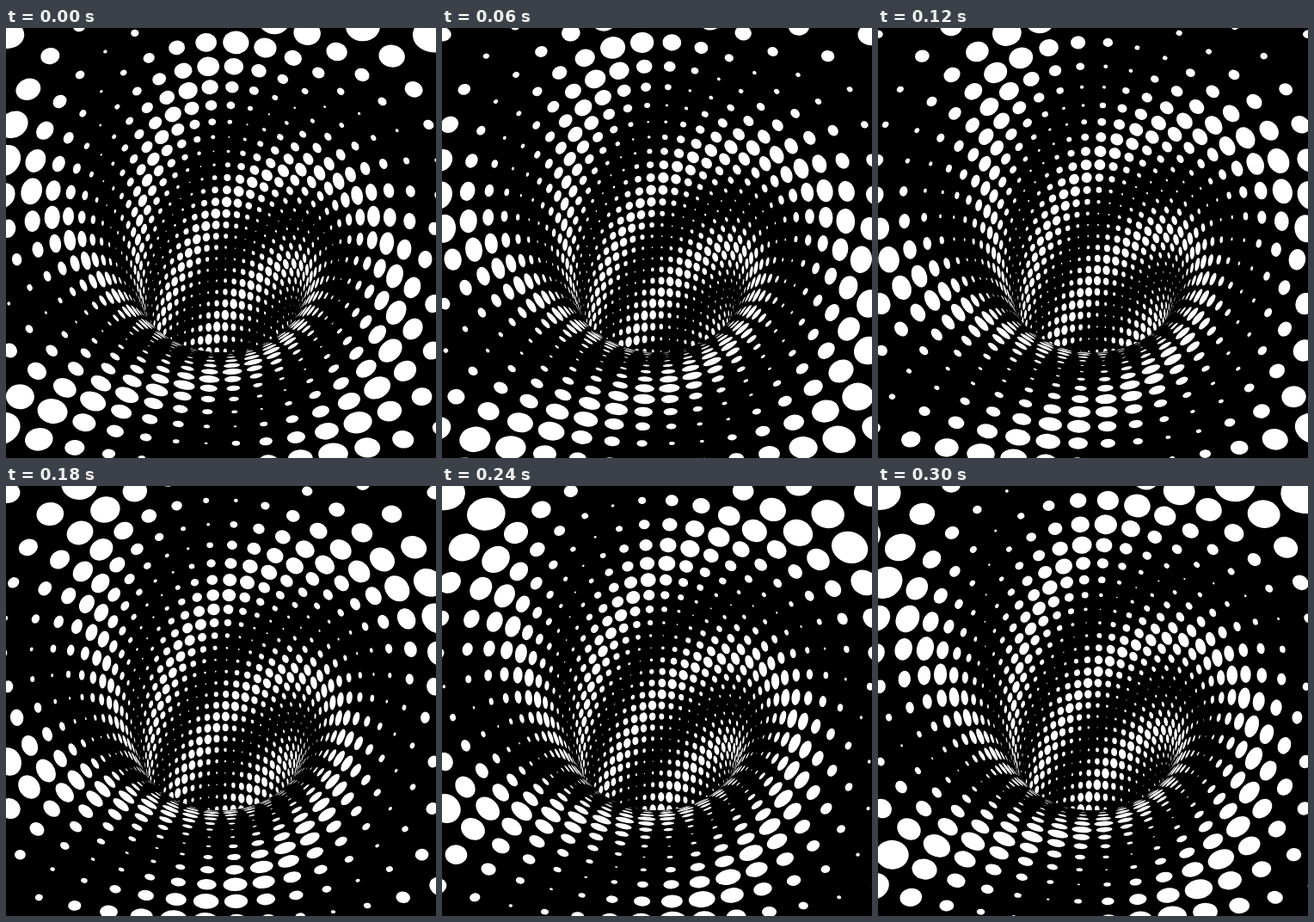
An HTML page with a canvas that plays this animation: 500x500 px, repeating every 0.33 s.

```html
<!DOCTYPE html>
<html lang="en">
<head>
<meta charset="utf-8">
<title>Dotted tunnel</title>
<style>
  html, body { margin: 0; width: 100%; height: 100%; overflow: hidden; background: #000; }
  canvas { display: block; width: 500px; height: 500px; }
</style>
</head>
<body>
<canvas id="stage" width="500" height="500"></canvas>
<script>
const ctx = document.getElementById('stage').getContext('2d');
const STEPS = 11, STEP_MS = 30;
const SPOKES = 40, RINGS = 80;
const FIRST = -12, LAST = 24;
const TAU = Math.PI * 2;
const FOCAL = 299.5, TILT = 0.1815;

// The view from inside a bent tube (torus 2:1); u counts rings, v counts spokes.
function project(u, v) {
  const tilt = TILT - u * TAU / RINGS;
  const phi = (v + 0.5) * TAU / SPOKES;
  const reach = 2 + Math.cos(phi);
  const depth = 1.896 - reach * Math.sin(tilt);
  const up = reach * Math.cos(tilt) - 1.893;
  const scale = FOCAL / depth;
  return { x: 250 + scale * Math.sin(phi), y: 250 - scale * up, depth };
}

// A dot is a circle on the surface, flattened by the local slope.
function makeDot(u, v) {
  const p = project(u, v);
  if (p.depth < 0.3) return null;
  const h = 0.1;
  const slope = (a, b) => [(a.x - b.x) / (2 * h), (a.y - b.y) / (2 * h)];
  const du = slope(project(u + h, v), project(u - h, v));
  const dv = slope(project(u, v + h), project(u, v - h));
  if (du[0] * dv[1] - du[1] * dv[0] >= 0) return null;
  const reach = 0.6 * (Math.hypot(...du) + Math.hypot(...dv));
  if (Math.abs(p.x - 250) > 250 + reach || Math.abs(p.y - 250) > 250 + reach) return null;
  return { matrix: [...du, ...dv, p.x, p.y], phase: u + v - 0.15 };
}

function addLoop(path, u) {
  for (let k = 0; k < 120; k++) {
    const p = project(u, k / 3);
    k ? path.lineTo(p.x, p.y) : path.moveTo(p.x, p.y);
  }
  path.closePath();
}

// Deepest ring first; each black band overlaps the next one to leave no seam.
const rings = [];
for (let u = LAST; u >= FIRST; u--) {
  const dots = [];
  for (let v = 0; v < SPOKES; v++) {
    const dot = makeDot(u, v);
    if (dot) dots.push(dot);
  }
  let band = null;
  if (u >= -2) {
    band = new Path2D();
    addLoop(band, u + 0.5);
    addLoop(band, u - 1.5);
  }
  rings.push({ dots, band });
}

function radius(phase) {
  const s = ((phase % 10) + 10) % 10;
  return 0.448 - 0.081 * Math.min(s, 10 - s);
}

function draw(step) {
  const shift = 10 * step / STEPS;
  ctx.setTransform(1, 0, 0, 1, 0, 0);
  ctx.fillStyle = '#000';
  ctx.fillRect(0, 0, 500, 500);
  for (const { dots, band } of rings) {
    if (band) {
      ctx.setTransform(1, 0, 0, 1, 0, 0);
      ctx.fillStyle = '#000';
      ctx.fill(band, 'evenodd');
    }
    ctx.fillStyle = '#fff';
    for (const { matrix, phase } of dots) {
      ctx.setTransform(...matrix);
      ctx.beginPath();
      ctx.arc(0, 0, radius(phase + shift), 0, TAU);
      ctx.fill();
    }
  }
}

const start = performance.now();
let shown = -1;
function tick() {
  const step = Math.floor((performance.now() - start) / STEP_MS) % STEPS;
  if (step !== shown) draw(shown = step);
  requestAnimationFrame(tick);
}
tick();
</script>
</body>
</html>
```
